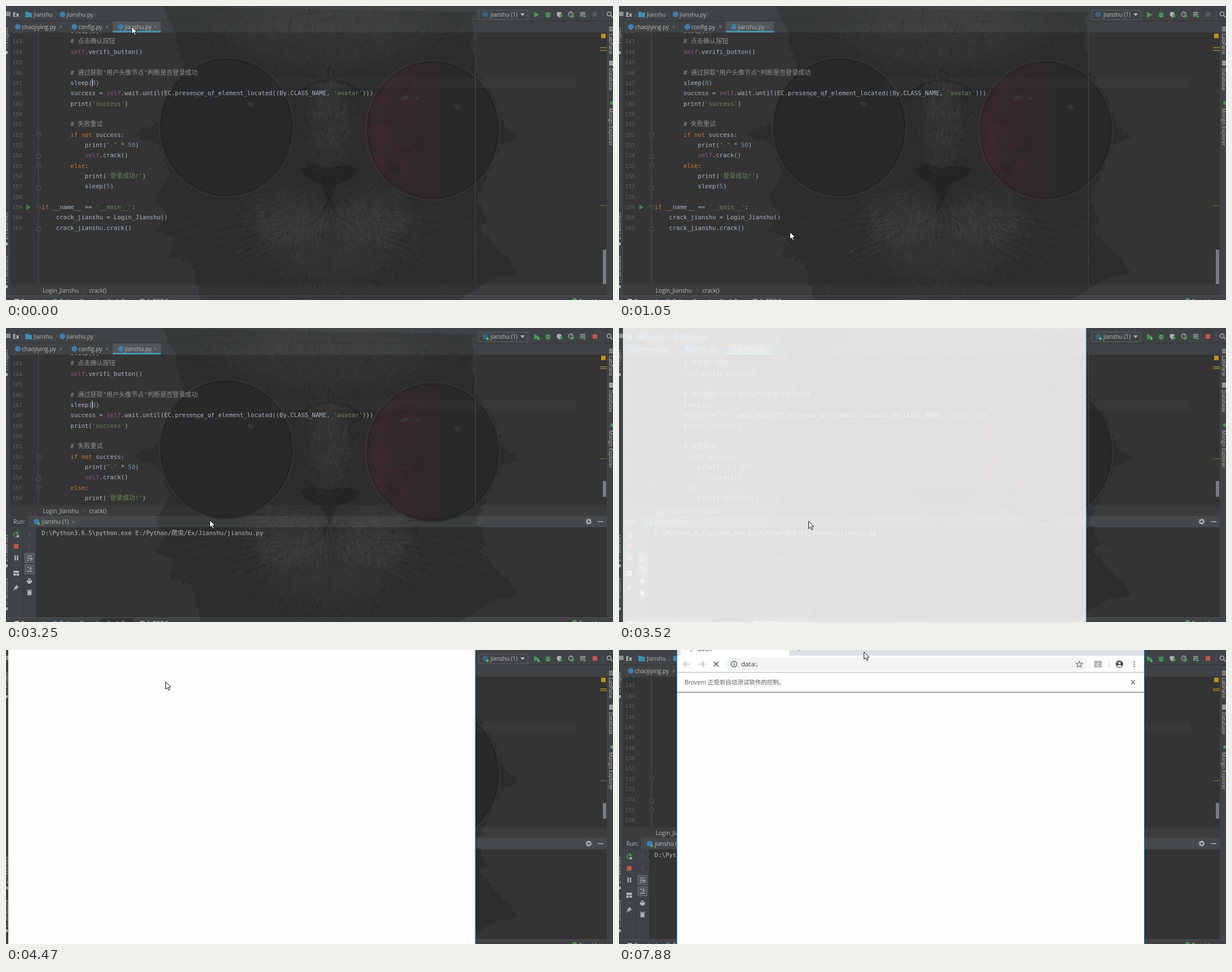
An HTML page with a canvas for the animation above (8000 ms loop, 1074 by 521 pixels).

```html
<!DOCTYPE html>
<html lang="en">
<head>
<meta charset="utf-8">
<title>Editor run</title>
<style>
html, body { margin: 0; width: 100%; height: 100%; overflow: hidden; background: #333; }
canvas { display: block; }
</style>
</head>
<body>
<canvas id="stage" width="1074" height="521"></canvas>
<script>
const W = 1074, H = 521, LOOP = 8000, TAU = Math.PI * 2;
const UI = '"Open Sans", "Noto Sans CJK SC", sans-serif';
const MONO = '"DejaVu Sans Mono", "Noto Sans CJK SC", monospace';
const BAR = '#404345', GREY = '#afb1b3', GREEN = '#499c54', RED = '#c75450', BLUE = '#3f7fb0', TEXT = '#bbbbbb';
const stage = document.getElementById('stage').getContext('2d');
let c = stage;

// ---------- drawing helpers ----------
function rect(x, y, w, h, color) { c.fillStyle = color; c.fillRect(x, y, w, h); }
function frame(x, y, w, h, color) { c.strokeStyle = color; c.lineWidth = 1; c.strokeRect(x + .5, y + .5, w, h); }
function disc(x, y, r, color) { c.fillStyle = color; c.beginPath(); c.arc(x, y, r, 0, TAU); c.fill(); }
function oval(x, y, rx, ry, color, turn = 0) {
  c.fillStyle = color; c.beginPath(); c.ellipse(x, y, rx, ry, turn, 0, TAU); c.fill();
}
function ring(x, y, r, color, width = 1.2, from = 0, to = TAU) {
  c.strokeStyle = color; c.lineWidth = width; c.beginPath(); c.arc(x, y, r, from, to); c.stroke();
}
function trace(points) {
  c.beginPath();
  for (let i = 0; i < points.length; i += 2) c.lineTo(points[i], points[i + 1]);
}
function line(points, color, width = 1) { trace(points); c.strokeStyle = color; c.lineWidth = width; c.stroke(); }
function poly(points, color) { trace(points); c.closePath(); c.fillStyle = color; c.fill(); }
function label(text, x, y, color = TEXT, size = 10, align = 'left', weight = '') {
  c.font = `${weight} ${size}px ${UI}`;
  c.textAlign = align;
  c.fillStyle = color;
  c.fillText(text, x, y + 3.6);
}
function sideways(text, x, y, turn, color = TEXT) {
  c.save(); c.translate(x, y); c.rotate(turn * TAU / 4);
  label(text, 0, -3.6, color, 9);
  c.restore();
}
// Monospaced text whose Chinese characters are set slightly larger
function mono(text, x, y, color) {
  c.textAlign = 'left';
  c.fillStyle = color;
  for (const run of text.match(/[\u2e80-\u9fff]+|[^\u2e80-\u9fff]+/g) || []) {
    c.font = `${/[\u2e80-\u9fff]/.test(run) ? 11.1 : 10.6}px ${MONO}`;
    c.fillText(run, x, y + 3.6);
    x += c.measureText(run).width;
  }
  return x;
}
function cross(x, y, r, color, width = 1) {
  line([x - r, y - r, x + r, y + r], color, width);
  line([x + r, y - r, x - r, y + r], color, width);
}

// ---------- wallpaper ----------
function makeWallpaper() {
  const layer = document.createElement('canvas');
  layer.width = W; layer.height = H;
  c = layer.getContext('2d');
  let seed = 11;
  const rnd = () => (seed = seed * 16807 % 2147483647) / 2147483647;
  const dark = a => `rgba(0,0,0,${a})`, light = a => `rgba(255,255,255,${a})`;
  const edge = [276,0, 300,45, 312,110, 285,160, 270,205, 228,224, 236,234, 272,246, 290,300, 264,338, 284,366, 264,398,
    300,410, 290,440, 330,458, 345,521, 800,521, 850,490, 905,470, 868,428, 838,395, 850,380, 832,345, 850,300, 876,245,
    914,232, 882,212, 862,160, 835,122, 822,70, 830,0];
  const outline = [];
  for (let i = 0; i < edge.length - 2; i += 2) {
    for (let k = 0; k < 10; k++) {
      const f = k / 10, j = k ? 9 : 0;
      outline.push(edge[i] + (edge[i + 2] - edge[i]) * f + (rnd() - .5) * j,
        edge[i + 1] + (edge[i + 3] - edge[i + 1]) * f + (rnd() - .5) * j);
    }
  }
  poly(outline, dark(.15));

  // Fur: each tuft is a soft glow crossed by short hairs pointing away from the nose
  const tufts = [[572,50,235,75,600], [572,205,48,105,420], [495,370,85,60,420], [655,370,85,60,420], [572,425,160,85,500]];
  for (const [x, y, rx, ry, hairs] of tufts) {
    c.save(); c.translate(x, y); c.scale(rx, ry);
    const glow = c.createRadialGradient(0, 0, .45, 0, 0, 1);
    glow.addColorStop(0, light(.035));
    glow.addColorStop(1, light(0));
    disc(0, 0, 1, glow);
    c.restore();
    for (let i = 0; i < hairs; i++) {
      const a = rnd() * TAU, r = Math.sqrt(rnd());
      const px = x + Math.cos(a) * r * rx, py = y + Math.sin(a) * r * ry;
      const dir = Math.atan2(py - 290, px - 572) + (rnd() - .5) * .6, len = 3 + rnd() * 9;
      line([px, py, px + Math.cos(dir) * len, py + Math.sin(dir) * len], rnd() < .5 ? dark(.13) : light(.04), 1.3);
    }
  }

  line([508,160, 540,138, 572,130, 606,138, 637,160], dark(.16), 5);
  for (const [x, y] of [[390, 215], [755, 220]]) {
    const red = x > 500;
    oval(x, y, 119, 124, '#292929');
    c.lineWidth = 2; c.strokeStyle = '#353535'; c.stroke();
    c.save(); c.clip();
    if (red) {
      const tint = c.createLinearGradient(x - 118, 0, x + 30, 0);
      tint.addColorStop(0, 'rgba(78,38,50,.32)');
      tint.addColorStop(.55, 'rgba(72,36,48,.25)');
      tint.addColorStop(1, 'rgba(70,36,46,0)');
      rect(x - 120, y - 125, 240, 250, tint);
    }
    for (let i = 0; i < 22; i++) {
      const px = x - 105 + rnd() * 90, py = y - 80 + rnd() * 170;
      oval(px, py, 6 + rnd() * 14, 4 + rnd() * 9, red ? `rgba(${i % 2 ? '35,35,37' : '84,38,52'},.16)` : 'rgba(44,44,56,.1)', rnd() * 3);
    }
    for (let i = 0; i < 12; i++) disc(x - 90 + rnd() * 180, y - 70 + rnd() * 150, .7, '#444446');
    oval(x - 50, y - 57, 8, 4, '#373538', -.4);
    oval(x - 27, y - 57, 4, 3, '#373538');
    oval(x + 43, y - 41, 6, 4, '#373538', .5);
    c.restore();
    c.beginPath(); c.ellipse(x, y, 115, 120, 0, 0, TAU);
    c.lineWidth = 1.5; c.strokeStyle = '#232323'; c.stroke();
  }
  poly([520,290, 538,282, 572,286, 606,282, 626,290, 612,305, 585,316, 574,345, 570,345, 558,316, 532,305], dark(.17));
  line([572,340, 560,372, 525,392], dark(.1), 3);
  line([572,340, 586,372, 625,392], dark(.1), 3);
  for (let i = 0; i < 8; i++) {
    for (const side of [-1, 1]) {
      c.beginPath();
      c.moveTo(572 + side * 85, 372 + i * 7);
      c.quadraticCurveTo(572 + side * 190, 366 + i * 14, 572 + side * (315 - i * 16), 400 + i * 16);
      c.strokeStyle = light(.05); c.lineWidth = 1; c.stroke();
    }
  }
  c = stage;
  return layer;
}
const wallpaper = makeWallpaper();

// ---------- icons ----------
const python = (x, y) => disc(x, y, 5, BLUE);
const icons = {
  python,
  play(x, y) { poly([x - 4, y - 5, x + 5, y, x - 4, y + 5], GREEN); },
  bug(x, y) {
    oval(x, y + .5, 3.3, 4.6, GREEN);
    for (const d of [-3, 0, 3]) line([x - 5, y + d, x + 5, y + d], GREEN);
    line([x - 1.5, y, x + 1.5, y], '#3c3f41');
  },
  shield(x, y) {
    poly([x - 5, y - 4, x - 1, y - 5, x + 3, y - 4, x + 3, y + 1, x - 1, y + 5, x - 5, y + 1], GREY);
    poly([x, y - 2, x + 6, y + 2, x, y + 6], GREEN);
  },
  profile(x, y) {
    ring(x - 1, y - 1, 4, GREY, 1.3); line([x - 1, y - 1, x + 1, y - 4], GREY);
    poly([x, y - 1, x + 6, y + 2.5, x, y + 6], GREEN);
  },
  threads(x, y) {
    for (const d of [-4, -1, 2]) line([x - 5, y + d, x + (d < 0 ? 4 : 0), y + d], GREY, 1.5);
    poly([x + 1, y, x + 6, y + 3, x + 1, y + 6], GREEN);
  },
  columns(x, y) { frame(x - 5, y - 5, 9, 9, GREY); line([x, y - 6, x, y + 6], GREY); },
  rows(x, y) { frame(x - 4, y - 5, 8, 3, GREY); frame(x - 4, y + 1, 8, 3, GREY); },
  console(x, y) { frame(x - 4, y - 4, 8, 8, GREY); line([x - 2, y - 2, x, y, x - 2, y + 2], GREY); }
};

// ---------- editor window ----------
const CODE = `        sleep(5)
        # 点击确认按钮
        self.verifi_button()

        # 通过获取"用户头像节点"判断是否登录成功
        sleep(8)
        success = self.wait.until(EC.presence_of_element_located((By.CLASS_NAME, 'avatar')))
        print('success')

        # 失败重试
        if not success:
            print("-" * 50)
            self.crack()
        else:
            print('登录成功!')
            sleep(5)

if __name__ == '__main__':
    crack_jianshu = Login_Jianshu()
    crack_jianshu.crack()`.split('\n');
const TOKENS = /(#.*)|('[^']*'|"[^"]*")|\b(if|not|else)\b|\b(self)\b|\b(\d+)\b|(\w+|\W)/g;
const COLORS = ['', '#909192', '#6a8759', '#cc7832', '#94558d', '#6897bb', '#a9b7c6'];
const FOLDS = { 152: 1, 154: -1, 155: 1, 157: -1, 159: 1, 161: -1 };

function drawCode(bottom, caret) {
  c.save();
  c.beginPath(); c.rect(7, 47, 1056, bottom - 47); c.clip();
  rect(57, 47, 1, bottom - 47, '#4b4d4f');
  rect(830, 47, 1, bottom - 47, '#464646');
  rect(470, 127, 540, 18, 'rgba(255,255,255,.02)');
  CODE.forEach((text, i) => {
    const y = 44.5 + i * 18.35, number = 142 + i;
    c.font = `9.5px ${MONO}`; c.textAlign = 'left'; c.fillStyle = '#606366';
    c.fillText(number, 11, y + 3.6);
    const indent = text.search(/\S|$/);
    let x = 63 + indent * 6.38;
    for (const m of text.trim().matchAll(TOKENS)) x = mono(m[0], x, y, COLORS[m.findIndex((g, k) => k && g)]);
    const d = FOLDS[number];
    if (d) {
      const box = [54, y + 1 - 4 * d, 61, y + 1 - 4 * d, 61, y + 1 + d, 57.5, y + 1 + 4 * d, 54, y + 1 + d, 54, y + 1 - 4 * d];
      poly(box, '#313335'); line(box, '#56595b'); line([56, y, 59, y], '#56595b');
    }
    if (number === 159) poly([36, y - 5, 44, y, 36, y + 5], '#3f7f49');
  });
  if (caret) rect(152, 129, 1, 14, '#dddddd');
  c.restore();
}

function drawToolbar(running) {
  label('Ex', 12, 15, '#cccccc', 10, 'left', 'bold');
  rect(0, 10, 8, 8, '#8b8f91');
  poly([34,10, 39,10, 41,12, 46,12, 46,20, 34,20], '#3d8fb5');
  label('Jianshu', 49, 15); python(100, 15); label('jianshu.py', 107, 15);
  for (const x of [27, 87, 156]) line([x, 10, x + 3, 15, x, 20], '#5c5f61');
  frame(836, 7, 87, 17, '#5e6162');
  disc(848, 15, 5, '#39617f'); label('jianshu (1)', 857, 15.5);
  poly([910,13, 918,13, 914,18], GREY);
  ['play', 'bug', 'shield', 'profile', 'threads'].forEach((name, i) => icons[name](938.5 + i * 20.6, 15.5));
  rect(1038, 11, 8, 8, running ? RED : '#55585a');
  if (running) { disc(942, 19, 2.2, '#3fd04f'); disc(852, 19, 2.2, '#3fd04f'); }
  rect(1056, 8, 1, 15, '#535658');
  ring(1067, 14, 3.6, GREY, 1.5); line([1070, 17, 1073, 20], GREY, 1.7);
}

function drawTabs() {
  rect(7, 26, 1067, 1, '#323435');
  rect(189, 27, 85, 17, '#515658'); rect(189, 44, 85, 3, '#4596b1');
  [['chaojiying.py', 28, 97], ['config.py', 128, 179], ['jianshu.py', 210, 264]].forEach(([name, x, close]) => {
    python(x - 7, 37); label(name, x, 37.5); cross(close, 37, 2.4, '#7b7e80');
  });
  rect(107, 28, 1, 18, '#36393a');
}

function drawSides() {
  sideways('1: Project', 3, 77, -1); sideways('2: Favorites', 3, 414, -1); sideways('7: Structure', 3, 491, -1);
  for (const y of [80, 419, 495]) rect(0, y, 3, 5, GREY);
  for (const y of [37, 40, 43]) rect(1067, y, 7, 1.5, GREY);
  for (const y of [97, 100, 103]) rect(1067, y, 7, 2.4, GREY);
  disc(1072, 172, 3, GREEN);
  sideways('LabPane', 1067, 49, 1); sideways('Database', 1067, 110, 1); sideways('Mongo Explorer', 1067, 181, 1);
}

function drawRunPanel() {
  rect(7, 333, 32, 20, '#3a3d3f'); rect(39, 333, 87, 20, '#45494b');
  label('Run:', 13, 343.5); python(54, 343); disc(58, 347, 2, '#3fd04f');
  label('jianshu (1)', 63, 343.5); cross(119, 344, 2.4, '#7b7e80');
  ring(1031, 343, 3.2, GREY, 2.2);
  for (let a = 0; a < 8; a++) {
    const u = Math.cos(a * TAU / 8), v = Math.sin(a * TAU / 8);
    line([1031 + u * 3, 343 + v * 3, 1031 + u * 5.4, 343 + v * 5.4], GREY, 1.6);
  }
  rect(1047, 342.5, 10, 1.5, GREY);
  rect(29, 354, 1, 159, '#35383a');
  ring(18, 366, 4, GREEN, 1.5, .8, 5.4); poly([19,360, 23,364, 18,366], GREEN); rect(19, 367, 4, 4, GREY);
  rect(14, 383, 8, 8, RED);
  rect(15, 403, 2.4, 9, GREY); rect(19.2, 403, 2.4, 9, GREY);
  rect(12, 420, 13, 1, '#55585a'); rect(12, 447, 13, 1, '#55585a');
  rect(13, 430, 10, 4, GREY); rect(13, 435, 4.5, 4, GREY); rect(18.5, 435, 4.5, 4, GREY);
  poly([18,455, 23,460, 20,461, 18,464, 14,460, 17,458], GREY); line([16, 462, 13, 465], GREY, 1.3);
  for (const [y, d] of [[366, -1], [387, 1]]) {
    line([41.5, y - 4 * d, 41.5, y + 4 * d], '#595c5e'); line([38.5, y + d, 41.5, y + 4 * d, 44.5, y + d], '#595c5e');
  }
  for (const y of [407, 427]) { rect(33, y - 8, 17, 17, '#505355'); frame(33, y - 8, 16, 16, '#6f7274'); }
  line([37, 404, 46, 404], GREY, 1.3); line([37, 408, 46, 408, 46, 411, 42, 411], GREY, 1.3); line([37, 412, 40, 412], GREY, 1.3);
  line([37, 424, 41, 424], GREY, 1.3); line([37, 431, 46, 431], GREY, 1.5);
  line([43.5, 422, 43.5, 428], GREY, 1.3); line([41, 426, 43.5, 428.5, 46, 426], GREY);
  rect(37, 447, 9, 4, GREY); rect(39, 444, 5, 2, GREY); rect(39, 451, 5, 2, GREY);
  rect(38, 466, 7, 7.5, GREY); rect(37, 464, 9, 1.3, GREY);
  mono('D:\\Python3.6.5\\python.exe E:/Python/爬虫/Ex/Jianshu/jianshu.py', 63, 363, '#bbbbbb');
}

function drawEditor(panel, running, caret) {
  const bottom = panel ? 314 : 494;
  rect(0, 0, W, H, BAR);
  rect(7, 47, 1056, bottom - 47, '#343434');
  rect(7, 47, 50, bottom - 47, '#333536');
  rect(7, bottom, 1056, 19, '#3a3c3d');
  if (panel) {
    rect(7, 333, 1056, 20, '#46494b');
    rect(53, 353, 1010, 160, '#343434');
  }
  rect(0, 513, W, 1, '#55585a');
  c.drawImage(wallpaper, 0, 0);
  drawToolbar(running); drawTabs(); drawSides();
  drawCode(bottom, caret);
  rect(1053, 49, 8, 8, '#be9117');
  for (const y of panel ? [68, 71] : [73, 78]) rect(1051, y, 12, 1.5, '#a8821c');
  rect(1051, panel ? 231 : 353, 12, 1.2, '#7a6a45');
  if (panel) rect(1056, 271, 6, 28, '#7a7b7c'); else rect(1056, 432, 6, 61, '#7a7b7c');
  label('Login_Jianshu', 65, bottom + 10); label('crack()', 147.5, bottom + 10);
  line([137, bottom + 7, 140, bottom + 10, 137, bottom + 13], '#65686a');
  if (panel) { drawRunPanel(); rect(168, 514, 58, 7, '#2f3132'); }
  rect(15, 519, 8, 2, GREY); label('Terminal', 27, 523);
  disc(87, 522, 3.5, BLUE); label('Python Console', 95, 523);
  icons.play(184, 523); label('4: Run', 193, 523);
  rect(237, 519, 8, 1.4, GREY); label('6: TODO', 249, 523);
  disc(1006, 522, 4.5, GREEN); label('Event Log', 1014, 523);
}

// ---------- context menu: "&" marks the underlined letter, "-" a divider ----------
const MENU = `&Close|Ctrl+F4
Close Others
Close All
Close All but Pinned
-
Copy Path|Ctrl+Shift+C
Copy Relative Path|Ctrl+Alt+Shift+C
-
Split Vertically||columns
Split Horizontally||rows
Move Right
Move Down
Pin Tab
Tabs Placement|>
Sort Tabs By Filename
Open New Tabs At The End
-
Select Ne&xt Tab|Alt+向右箭头
Se&lect Previous Tab|Alt+向左箭头
Reopen Closed Tab
-
Add to &Favorites|>
Add All To Favorites|>
Rename File...
-
R&un 'jianshu (1)'|Ctrl+Shift+F10|play
&Debug 'jianshu (1)'||bug
Run 'jianshu (1)' with Coverage||shield
Profile 'jianshu (1)'||profile
&Concurrency Diagram for 'jianshu (1)'||threads
-
Save 'jianshu (1)'||python
-
Show in Explorer
Open in Terminal||console`.split('\n');
let menuY = 44;
const menuRows = MENU.map(entry => {
  const [text, key = '', icon] = entry.split('|'), y = menuY;
  menuY += text === '-' ? 3.25 : 16.75;
  return { text, key, icon, y };
});

function drawMenu(pointerY) {
  rect(222, 35, 220, 486, '#3c3f41'); frame(222, 35, 219, 500, '#515456');
  const active = menuRows.filter(r => r.text !== '-' && r.y - 8.4 <= pointerY).pop();
  for (const row of menuRows) {
    const { text, key, icon, y } = row;
    if (text === '-') { rect(223, Math.round(y - 7), 218, 1, '#515456'); continue; }
    if (row === active) rect(223, Math.round(y - 8), 218, 17, '#4b6eaf');
    const mark = text.indexOf('&'), plain = text.replace('&', '');
    label(plain, 242, y);
    if (mark >= 0) {
      const start = 242 + c.measureText(plain.slice(0, mark)).width;
      rect(start, Math.round(y + 5), c.measureText(plain[mark]).width, 1, TEXT);
    }
    if (key === '>') poly([429, y - 4, 434, y - .5, 429, y + 3], TEXT);
    else label(key, 431.5, y, TEXT, 10, 'right');
    if (icon) icons[icon](231.5, y);
  }
}

// ---------- browser window ----------
function drawBrowser(t) {
  if (t < 3650) {
    rect(7, 0, 820, H, 'rgba(255,255,255,.855)');
    rect(826, 0, 1, H, '#5aa5dc');
    return;
  }
  const [dx, dy] = t < 7750 ? [0, 0] : t < 7880 ? [46, 1] : [99, 1];
  c.save(); c.translate(dx, dy);
  rect(4, -dy, 826, H, '#fefefe');
  if (t >= 6650) {
    const ink = '#5f6368';
    rect(4, -dy, 826, 9 + dy, '#dee1e6');
    c.fillStyle = '#fefefe'; c.beginPath(); c.roundRect(10, -20, 192, 34, 6); c.fill();
    const spin = Math.floor(t / 130) * 1.1;
    ring(26, -2, 4, '#7d8287', 1.4, spin, spin + 4.4);
    label('data:,', 40, -3, '#45494d', 10);
    line([215, -3, 223, -3], ink); line([219, -7, 219, 1], ink);
    rect(4, 9, 826, 30, '#fefefe');
    for (const [x, d] of [[21, -1], [47, 1]]) {
      line([x - 5, 24, x + 5, 24], '#b9bbbe', 1.5);
      line([x + d, 19, x + 5 * d, 24, x + d, 29], '#b9bbbe', 1.5);
    }
    cross(73, 24, 4.3, '#4d5155', 1.6);
    c.fillStyle = '#f1f3f4'; c.beginPath(); c.roundRect(90, 13, 640, 22, 11); c.fill();
    ring(104.5, 24, 5, ink, 1.3); rect(104, 23, 1.3, 4, ink); rect(104, 21, 1.3, 1.3, ink);
    label('data:,', 117, 24, '#303336', 11.6);
    const star = [];
    for (let i = 0; i <= 10; i++) {
      const a = i * TAU / 10 - TAU / 4, r = i % 2 ? 2.7 : 6;
      star.push(715.5 + Math.cos(a) * r, 24.5 + Math.sin(a) * r);
    }
    line(star, ink, 1.1);
    rect(742, 18, 13, 12, '#b3b3b3'); label('C', 748.5, 24, '#fff', 9, 'center', 'bold');
    rect(768, 18, 1, 13, '#d0d2d5');
    disc(786.5, 24, 6.5, '#4d5156'); disc(786.5, 22, 2.1, '#fff'); oval(786.5, 27.3, 3.7, 1.7, '#fff');
    for (const y of [20, 24, 28]) disc(812.5, y, 1.2, ink);
    rect(4, 38, 826, 1, '#b4b4b4');
    label('Brovem 正受到自动测试软件的控制。', 17, 56, '#595c5f', 10.5);
    cross(810.5, 56, 3.4, ink, 1.4);
    rect(4, 73, 826, 1, '#929292'); rect(4, 74, 826, 1, '#c9c9c9'); rect(4, 75, 826, 1, '#ececec');
  }
  if (dx) rect(3, -dy, 1, H, '#1c86d8');
  rect(830, -dy, 1, H, '#0f7bd2');
  c.restore();
}

// ---------- pointer: time, x, y ----------
const PATH = [[0,222,36], [260,235,85], [380,250,150], [520,270,245], [640,283,333], [790,286,372], [910,290,391],
  [1050,302,400], [1170,318,412], [1330,345,436], [1480,366,464], [1870,368,485], [2000,365,500], [2120,362,509],
  [2830,363,506], [2980,452,420], [3100,397,327], [3250,360,340], [3370,335,342], [3790,430,240], [3920,425,140],
  [4040,398,79], [4190,287,61], [4470,282,56], [7060,284,54], [7210,296,40], [7330,292,20], [7450,287,5],
  [7600,286,4], [7750,380,4], [7880,433,3]];
const between = (t, from, to) => t >= from && t < to;

function drawPointer(t, x, y) {
  if (between(t, 1330, 3100)) {
    line([x + .5, y - 6, x + .5, y + 7], '#dddddd');
    for (const end of [y - 5.5, y + 6.5]) line([x - 2, end, x + 3, end], '#dddddd');
    return;
  }
  const arrow = [0,0, 0,13, 3,10.3, 5.3,15, 7.3,14, 5.2,9.5, 9.2,9.2].map((v, i) => v + (i % 2 ? y : x) + .5);
  poly(arrow, '#fff');
  c.lineJoin = 'round';
  line([...arrow, arrow[0], arrow[1]], '#111');
}

function draw() {
  const t = performance.now() % LOOP;
  const [, x, y] = PATH.filter(p => p[0] <= t).pop();
  const caret = between(t, 0, 260) || between(t, 1330, 1870) || between(t, 2270, 2830) || between(t, 3250, 3520);
  drawEditor(t >= 1480, t >= 1600, caret);
  if (between(t, 140, 1050)) drawMenu(y);
  if (t >= 3520) drawBrowser(t);
  drawPointer(t, x, y);
  requestAnimationFrame(draw);
}
draw();
</script>
</body>
</html>
```
